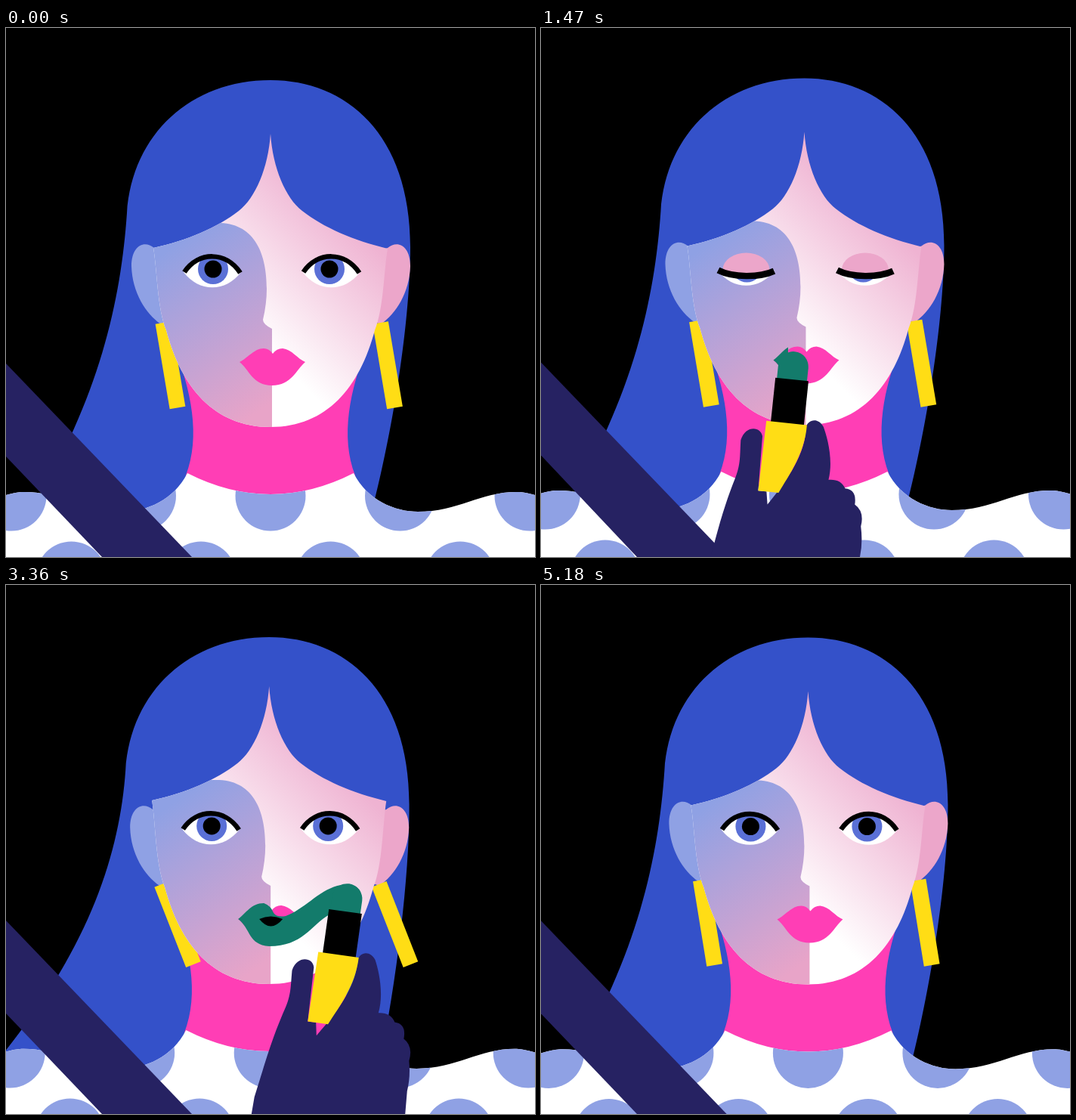
An HTML page with a canvas that plays this animation: 700 px wide and 700 px high, repeating every 5250 ms.

```html
<!DOCTYPE html>
<html lang="en">
<head>
<meta charset="utf-8">
<title>Lipstick on the road</title>
<style>
  html, body { margin: 0; height: 100%; overflow: hidden; background: #000; }
  canvas { display: block; width: 100vw; height: 100vh; }
</style>
</head>
<body>
<canvas id="stage" width="700" height="700"></canvas>
<script>
const ctx = document.getElementById('stage').getContext('2d');
const LOOP = 5250, STEP = 70, JOLT = 2330;
const BLUE = '#3451c9', PINK = '#ff3eb5', DOT = '#8fa1e4', NAVY = '#262262',
      YELLOW = '#ffdd15', GREEN = '#137b6b', ROSE = '#eca6ca';

// Eased 0 to 1 between a and b
function ramp(t, a, b) {
  const u = Math.min(1, Math.max(0, (t - a) / (b - a)));
  return u * u * (3 - 2 * u);
}

// Rises between a and b, falls between c and d
const pulse = (t, a, b, c, d) => ramp(t, a, b) - ramp(t, c, d);

// Damped swing after the jolt
function spring(t, size, half, decay) {
  const u = Math.max(0, t);
  return size * Math.sin(Math.PI * u / half) * Math.exp(-u / decay);
}

function pose(t) {
  const arc = Math.sin(Math.PI * t / LOOP), beat = 14 * Math.PI * t / LOOP;
  const sway = spring(t - JOLT - 50, 556, 700, 480);
  const dangle = 7.3 + 2.3 * Math.cos(beat), drift = 4 * (9.6 - dangle);
  return {
    dx: -2 * arc + 3.5 * pulse(t, 4600, 5100, 5200, LOOP),
    dy: -3.5 * arc - 1.2 * Math.sin(beat) - spring(t - JOLT, 131, 600, 300),
    pitch: 6 * pulse(t, 2600, 3000, 3400, 3700),
    sway,
    left: sway + drift,
    right: Math.max(0, sway) + drift / 2,
    angle: dangle - .24 * sway,
    lid: .76 * pulse(t, 280, 490, 1500, 1640) + pulse(t, 3900, 4060, 4760, 4900)
  };
}

function fill(d, color) {
  const p = new Path2D(d);
  ctx.fillStyle = color;
  ctx.fill(p);
  return p;
}

function disc(x, y, r, color) {
  ctx.fillStyle = color;
  ctx.beginPath();
  ctx.arc(x, y, r, 0, 7);
  ctx.fill();
}

function group(x, y, deg, draw) {
  ctx.save();
  ctx.translate(x, y);
  ctx.rotate(deg * Math.PI / 180);
  draw();
  ctx.restore();
}

function gradient(x0, y0, x1, y1, from, to) {
  const g = ctx.createLinearGradient(x0, y0, x1, y1);
  g.addColorStop(0, from);
  g.addColorStop(1, to);
  return g;
}

function hair({ left, right }) {
  const xl = 32 + left, xr = 484 + 1.2 * right;
  const l = 160 - .025 * Math.max(0, left), r = 535 + .04 * right;
  fill(`M${r} 290C${r} 140 450 69 350 69C245 69 ${l + 7} 140 ${l} 245
    C152 360 ${124 + .3 * left} 490 ${xl} 640V662H${xr}V640
    C${515 + .5 * right} 520 ${535 + .12 * right} 380 ${r} 290Z`, BLUE);
}

function body() {
  fill('M222 420C245 480 258 540 238 592L350 640L462 592C442 540 455 480 478 420Z', PINK);
  ctx.save();
  ctx.clip(fill(`M-30 628Q5 615 20 614C70 612 100 640 155 640C185 640 222 625 240 589
    Q350 645 460 589C478 625 515 640 545 640C600 640 630 612 680 614Q695 615 730 628V800H-30Z`, '#fff'));
  for (let i = -2; i <= 2; i++) {
    disc(350 + i * 171.5, 619, 46.5, DOT);
    disc(258 + i * 171.5, 726, 46.5, DOT);
  }
  ctx.restore();
}

function ear(color) {
  fill('M196 291C183 280 166 288 166 315C167 350 185 378 205 392L225 385V300Z', color);
}

function earring(x, angle) {
  group(x, 390, -angle, () => {
    ctx.fillStyle = YELLOW;
    ctx.fillRect(-10.5, 0, 21, 114);
  });
}

function eye(x, look, lid) {
  group(x, 322, 0, () => {
    const sag = 4 / 3 * (-20 + 37 * lid);
    ctx.save();
    ctx.clip(fill(`M-38 1C-18 ${sag} 18 ${sag} 38 1C18 28 -18 28 -38 1Z`, '#fff'));
    disc(look, -3, 20, '#5a70d6');
    disc(look, -3, 11.5, '#000');
    ctx.restore();
    if (lid > .02) fill(`M-31 0A31 22 0 0 1 31 0L37 1C18 ${sag} -18 ${sag} -37 1Z`, ROSE);
    ctx.lineWidth = 6.5 + 2.5 * lid;
    ctx.stroke(new Path2D(`M-37 1C-18 ${sag} 18 ${sag} 37 2`));
  });
}

function lips(t) {
  fill(`M309 442C320 437 328 424 341 424Q348 424 353 431Q358 424 366 424C378 425 386 438 396 442
    C384 452 378 473 352 473C326 473 322 452 309 442Z`, PINK);
  const left = 285 + 197 * ramp(t, 4130, 4480);
  const right = 300 + 57 * ramp(t, 1190, 1750) + 123 * ramp(t, 2310, 2660);
  const bottom = 455 + 27 * ramp(t, 2310, 2500);
  const open = pulse(t, 2380, 2900, 3850, 4130);
  if (right < left + 16) return;
  ctx.save();
  ctx.beginPath();
  ctx.roundRect(left, 300, right - left, bottom - 300, 15);
  ctx.clip();
  fill(`M309 442C320 434 326 421 343 421Q352 424 356 434Q360 440 372 438C395 430 415 405 440 398
    C465 392 474 402 472 420L470 436H430C405 450 395 478 350 478C322 476 326 455 309 442Z`, GREEN);
  fill(`M337 442Q352 ${442 - 7 * open} 368 442Q352 ${442 + 19 * open} 337 442Z`, '#000');
  ctx.restore();
}

function face(t, { pitch, lid }) {
  const up = y => y - pitch;
  const shape = fill(`M350 ${up(140)}C347 ${up(185)} 330 ${up(225)} 308 ${up(242)}
    C280 ${up(264)} 240 ${up(281)} 195 ${up(291)}
    C200 320 200 370 212 400C232 475 275 528 350 528C425 528 468 475 488 400
    C500 370 500 320 505 ${up(292)}C460 ${up(281)} 420 ${up(264)} 392 ${up(242)}
    C370 ${up(225)} 353 ${up(185)} 350 ${up(140)}Z`,
    gradient(365, 445, 505, 305, '#fff', '#efb3d2'));
  ctx.save();
  ctx.clip(shape);
  fill('M270 258H284C330 260 345 300 345 345Q345 365 340 386Q340 392 352 398V540H150V258Z',
    gradient(205, 300, 345, 500, DOT, '#e8a4c8'));
  ctx.restore();
  eye(273, 1, lid);
  eye(430.5, -2.5, lid);
  lips(t);
}

function head(t, p) {
  group(0, p.pitch, 0, () => {
    ear(DOT);
    group(701, 0, 0, () => { ctx.scale(-1, 1); ear(ROSE); });
    earring(208, p.angle);
    earring(495.5, p.angle);
  });
  face(t, p);
}

function lipstick(t, { dy, sway }) {
  const lower = ramp(t, 1750, 2030), smear = ramp(t, 2380, 2700);
  const away = 1 - pulse(t, 280, 770, 3480, 3850);
  const x = 345 - 25 * pulse(t, 950, 1200, 1250, 1700) - 12 * lower + smear * (114 - .03 * sway);
  const y = 465 + 20 * lower + smear * (.7 * dy - 53) + 380 * away;
  group(x, y, 6 - 2 * lower + 4 * smear, () => {
    fill('M-20 2V-17A20 20 0 0 1 20 -17V2Z', GREEN);
    fill(`M-31 79C-34 66 -55 66 -59 87C-58 110 -55 120 -63 145C-75 190 -78 220 -85 260L-90 420H125L114 224
      Q116 205 111 184Q114 164 100 156Q101 136 85 136Q78 124 62 127C66 100 54 70 48 58C40 46 26 50 25 62
      C28 95 10 130 -15 168L-18 151H-29Z`, NAVY);
    fill('M-22 0H22V59H-22Z', '#000');
    fill('M-28 58H26C27 95 10 125 -2 151H-29Z', YELLOW);
  });
}

function cottonPad(t) {
  const away = 1 - pulse(t, 3780, 4060, 4480, 4900);
  group(160 * away - 70 * pulse(t, 4000, 4200, 4200, 4410), 430 * away, 0, () => {
    disc(416, 453, 80, '#fff');
    fill(`M368 530C368 514 386 510 389 527L404 571Q408 573 407 567L388 515L376 470
      C372 455 384 449 391 454C388 428 410 420 420 438L466 540Q471 548 472 540L440 462
      C436 443 455 435 466 448L498 505Q518 545 530 580L566 695L600 1150H480L427 700
      C400 665 392 640 388 610C375 570 368 550 368 530Z`, NAVY);
  });
}

function draw(t) {
  const p = pose(t), pull = Math.min(12, -.6 * p.dy);
  ctx.fillStyle = '#000';
  ctx.fillRect(0, 0, 700, 700);
  group(p.dx, p.dy, 0, () => hair(p));
  group(p.dx, p.dy * .8, 0, body);
  group(p.dx, p.dy, 0, () => head(t, p));
  fill(`M0 ${444 - pull}L${246 + pull} 700H127L0 ${567 - pull}Z`, NAVY);
  lipstick(t, p);
  cottonPad(t);
}

const start = performance.now();
function frame() {
  const t = (performance.now() - start) % LOOP;
  draw(Math.floor(t / STEP) * STEP);
  requestAnimationFrame(frame);
}
frame();
</script>
</body>
</html>
```
